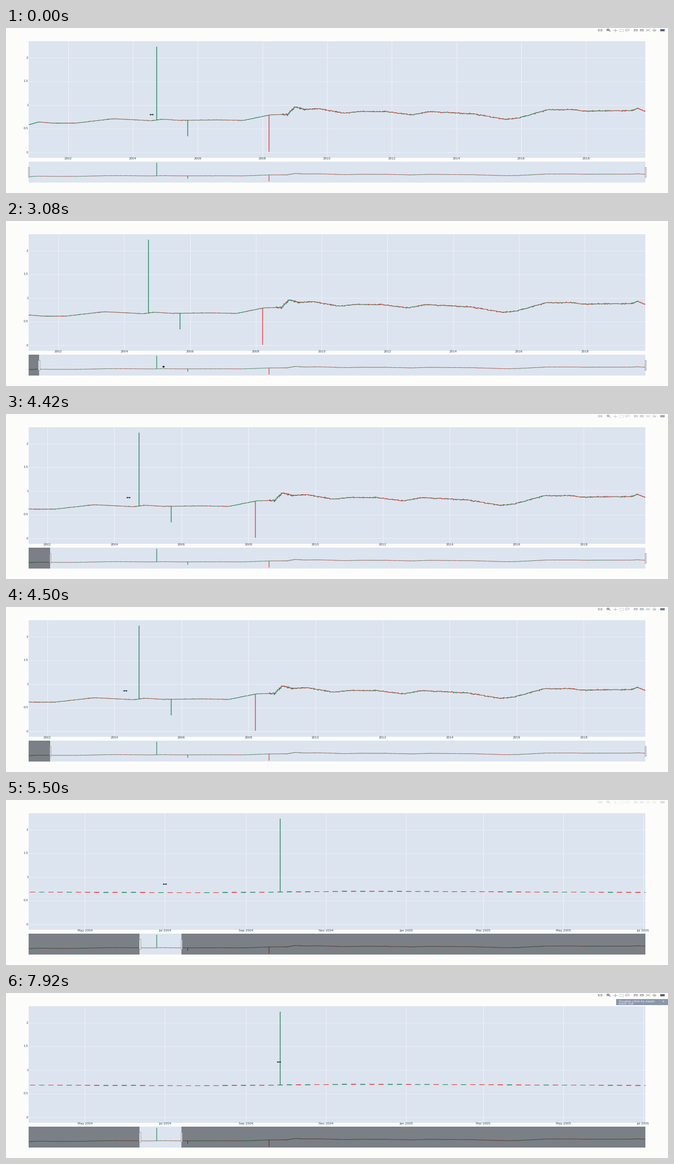
These frames come from a looping animation (1200 px wide and 300 px high, 8000 ms). A matplotlib script:

```python
import numpy as np
import matplotlib.pyplot as plt
from matplotlib.animation import FuncAnimation
from matplotlib.collections import LineCollection, PolyCollection
from matplotlib.patches import Ellipse, Polygon, Rectangle

W, H = 1200, 300
FRAMES, STEP = 160, 50
L, R, TOP, BOTTOM = 41, 1159, 24, 236
S_TOP, S_BOTTOM = 243, 281
PAGE, PANEL, GRID = "#fcfdfa", "#dce4ef", "#eef2f8"
INK, GREEN, RED = "#2a3f5f", "#2e8b63", "#e2453b"
ICON, ICON_ON, NOTE = "#a6abb5", "#5f6675", "#8a96ac"

# Time axis in days since 2000-01-01
DAY0, DAY1 = 285.3, 7245.4
ZOOM = (1539.0, 2009.7)
SCALE = (R - L) / (DAY1 - DAY0)
PEAK_DAY, PEAK, N = 1731, 206, 994

# Gestures in ms
PULL, DROP, SELECT, ZOOMED, NOTICE = 2670, 4250, 4600, 5490, 5580


def px(w):
    return w * 0.72


def day(text):
    return int((np.datetime64(text) - np.datetime64("2000-01-01")).astype(int))


def ramp(t, start, length):
    return min(max((t - start) / length, 0), 1)


def level(v):
    return 226 - 86 * v


def mini(y):
    return 279.2 - 15.3 * (226 - y) / 86


def make_bars():
    """Weekly bars: noise around a few turning points of the price."""
    turns = np.array([
        (41, 176), (58, 171), (85, 173), (125, 173), (194, 165), (263, 168.5),
        (283, 166), (316, 168), (380, 167), (430, 168), (478, 158),
        (510, 157), (523, 144), (540, 148), (568, 147), (612, 155),
        (640, 152), (690, 152), (733, 158), (768, 152), (845, 156),
        (905, 166), (928, 164), (980, 149), (1030, 148), (1043, 151),
        (1135, 150), (1145, 146), (1159, 152)])
    rng = np.random.default_rng(7)
    days = PEAK_DAY + 7 * (np.arange(N) - PEAK)
    x = L + (days - DAY0) * SCALE
    vol = .17 + .3 * (x > 500) + .7 * np.exp(-((x - 525) / 20) ** 2)
    close = np.interp(x, *turns.T) + vol * rng.normal(size=N)
    start = np.r_[close[0], close[:-1]]
    up = close < start
    reach = .4 * vol * np.abs(rng.normal(size=(2, N)))
    hi = np.minimum(start, close) - reach[0]
    lo = np.maximum(start, close) + reach[1]
    # Outliers: one jump up, two drops
    hi[PEAK], up[PEAK] = 34, True
    lo[PEAK + 50], up[PEAK + 50] = 197, True
    lo[PEAK + 181], up[PEAK + 181] = 225, False
    return days, x, start, close, hi, lo, np.where(up, GREEN, RED)


days, over, opened, close, hi, lo, tint = make_bars()

fig = plt.figure(figsize=(12, 3), dpi=100, facecolor=PAGE)
ax = fig.add_axes([0, 0, 1, 1])
ax.set(xlim=(0, W), ylim=(H, 0))
ax.axis("off")


def box(x0, y0, x1, y1, z, **kw):
    kw.setdefault("lw", 0)
    return ax.add_patch(Rectangle((x0, y0), x1 - x0, y1 - y0, zorder=z, **kw))


def label(x, y, s, ha="center", size=5.5, color=INK, **kw):
    return ax.text(x, y, s, ha=ha, va="center_baseline", color=color,
                   fontsize=px(size), family="DejaVu Sans", **kw)


def add(c, clip):
    ax.add_collection(c, autolim=False)
    c.set_clip_path(clip)
    return c


def lines(segs, z, clip, **kw):
    return add(LineCollection(segs, zorder=z, **kw), clip)


def stems(x, y0, y1):
    return np.stack([np.c_[x, y0], np.c_[x, y1]], axis=1)


# Main panel
panel = box(L, TOP, R, BOTTOM, 1, fc=PANEL)
ticks = np.arange(0, 2.5, .5)
lines([[(L, level(v)), (R, level(v))] for v in ticks], 2, panel,
      colors=GRID, lw=px(.8))
for v in ticks:
    label(40.5, level(v) - .5, f"{v:g}", ha="right")
grid = lines([], 2, panel, colors=GRID, lw=px(1))
names = [label(0, 237.4, "") for _ in range(9)]
wicks = lines([], 3, panel, lw=px(1.4), snap=False)
bodies = add(PolyCollection([], zorder=4, lw=px(.8), snap=False), panel)

# Range slider
strip = box(L, S_TOP, R, S_BOTTOM, 1, fc=PANEL)
trail = np.c_[over, mini(close)]
lines(np.stack([trail[:-1], trail[1:]], axis=1), 3, strip, colors=tint[1:],
      lw=px(.9))
lines(stems(over, mini(hi), mini(lo)), 4, strip, colors=tint, lw=px(1.2),
      snap=False, capstyle="butt")
shade = dict(fc="black", alpha=.44)
cuts = [box(L, S_TOP, L, S_BOTTOM, 5, **shade) for _ in range(2)]
grips = [box(0, 253, 2.4, 270.5, 6, fc="#eceef1", ec="#7a7d82", lw=px(.6))
         for _ in range(2)]

# Zoom box
veils = [box(L, TOP, L, BOTTOM, 7, **shade) for _ in range(2)]
corners = [box(0, 148, 1.6, 158, 8, fc="white", ec="#444", lw=px(.5))
           for _ in range(2)]


def build_bar():
    parts = []

    def put(p):
        p.set_zorder(9)
        parts.append(ax.add_patch(p))

    def rect(x, y, w, h, **kw):
        kw = kw or dict(fc=ICON, lw=0)
        put(Rectangle((x - w / 2, y - h / 2), w, h, **kw))

    def ring(x, y, w, h, color=ICON, fill="none"):
        put(Ellipse((x, y), w, h, fc=fill, ec=color, lw=px(.9)))

    def path(*pts, color=ICON):
        put(Polygon(pts, closed=False, fill=False, ec=color, lw=px(.9)))

    def plus(x, color, w, h):
        path((x - w, 4), (x + w, 4), color=color)
        path((x, 4 - h), (x, 4 + h), color=color)

    rect(1077, 4, 8, 3.6)
    ring(1077, 4, 3, 1.8, PAGE)
    ring(1091.3, 3.4, 4.6, 3, ICON_ON, ICON)
    path((1093, 4.6), (1096, 6.4), color=ICON_ON)
    plus(1103.8, ICON, 3.7, 2.6)
    rect(1115, 4, 7, 4.2, fc="none", ec=ICON, lw=px(.8), ls=(0, (1.5, 1)))
    ring(1126.3, 3.5, 7.4, 3)
    path((1123.5, 4.6), (1124.5, 6.4))
    rect(1141, 4, 7, 4)
    plus(1141, PAGE, 2, 1.2)
    rect(1152.3, 4, 7, 4)
    plus(1152.3, PAGE, 2, 0)
    path((1160, 2), (1167.5, 6))
    path((1160, 6), (1167.5, 2))
    path((1171, 4.2), (1175, 1.8), (1179, 4.2))
    rect(1175, 5, 5, 2.4)
    rect(1190, 4, 8, 4.4, fc="#56627a", lw=0)
    return parts


modebar = build_bar()

note = [box(1106, 11, W, 22, 9, fc=NOTE)]
for nx, ny, s in ((1111, 15, "Double-click to zoom"), (1111, 19.1, "back out"),
                  (1188.5, 15.4, "×")):
    note.append(label(nx, ny, s, ha="left", size=6.2, color="#f4f6fa",
                      zorder=10))

# Pointers
head = np.array([(1.6, -.6), (1.6, -1.6), (4, 0), (1.6, 1.6), (1.6, .6)])
ARROW = np.r_[head, -head]
turn = np.linspace(0, 2 * np.pi, 12)
HAND = np.c_[2 * np.cos(turn), 1.7 * np.sin(turn)]
pointer = ax.add_patch(Polygon(ARROW, fc="#1d2433", lw=0, zorder=12))

# Pointer stops: ms, x, y
STOPS = np.array([
    (80, 264, 157.5), (920, 262, 168), (2080, 275, 264.5), (PULL, 267, 265),
    (3540, 306, 265), (3750, 306, 265), (4417, 222, 152), (SELECT, 209.3, 153),
    (5080, 288, 153), (5920, 288, 153), (7080, 348, 172), (7166, 304, 175),
    (7500, 304, 175), (7917, 495, 125.5)])
SHORT = "Jan Mar May Jul Sep Nov".split()
YEARS = [(day(f"{y}-01-01"), str(y)) for y in range(2002, 2020, 2)]
MONTHS = [(day(f"{y}-{2 * m + 1:02d}-01"), f"{SHORT[m]} {y}")
          for y in (2004, 2005) for m in range(6)][2:10]


def span(rect, x0, x1):
    rect.set_x(x0)
    rect.set_width(max(x1 - x0, 0))


def show_view(a, b, marks):
    s = (R - L) / (b - a)
    x = L + (days - a) * s
    half = .27 * 7 * s
    m = (x + half > L) & (x - half < R)
    x, o, c = x[m], opened[m], close[m]
    wicks.set_segments(stems(x, hi[m], lo[m]))
    wicks.set_color(tint[m])
    left, right = x - half, x + half
    bodies.set_verts(np.stack([np.c_[left, o], np.c_[right, o],
                               np.c_[right, c], np.c_[left, c]], axis=1))
    bodies.set_color(tint[m])

    at = [L + (d - a) * s for d, _ in marks]
    grid.set_segments([[(g, TOP), (g, BOTTOM)] for g in at])
    for text in names:
        text.set_text("")
    for text, g, (_, s) in zip(names, at, marks):
        text.set_x(g)
        text.set_text(s)

    ends = [L + (d - DAY0) * SCALE for d in (a, b)]
    span(cuts[0], L, ends[0])
    span(cuts[1], ends[1], R)
    for grip, g in zip(grips, ends):
        grip.set_x(g - 1.2)


def update(i):
    t = np.floor((i * STEP + 35) * .012) / .012
    if t > ZOOMED:
        show_view(*ZOOM, MONTHS)
    else:
        show_view(DAY0 + 39 * ramp(t, PULL, 870) / SCALE, DAY1, YEARS)

    x, y = (np.interp(t, STOPS[:, 0], STOPS[:, k]) for k in (1, 2))
    pointer.set_xy((HAND if PULL <= t < 3750 else ARROW) + (x, y))

    for p in veils + corners:
        p.set_visible(SELECT < t < ZOOMED)
    span(veils[0], L, 209.3)
    span(veils[1], x, R)
    corners[0].set_x(207.6)
    corners[1].set_x(x)

    # The toolbar hides while dragging
    glow = 1 - ramp(t, PULL, 300) + ramp(t, DROP, 300) \
        - ramp(t, SELECT, 250) + ramp(t, ZOOMED - 50, 300)
    for p in modebar:
        p.set_alpha(min(max(glow, 0), 1))
    for p in note:
        p.set_alpha(ramp(t, NOTICE, 250))
    return []


anim = FuncAnimation(fig, update, frames=FRAMES, interval=STEP,
                     init_func=lambda: [], repeat=True, repeat_delay=0)
plt.show()
```
